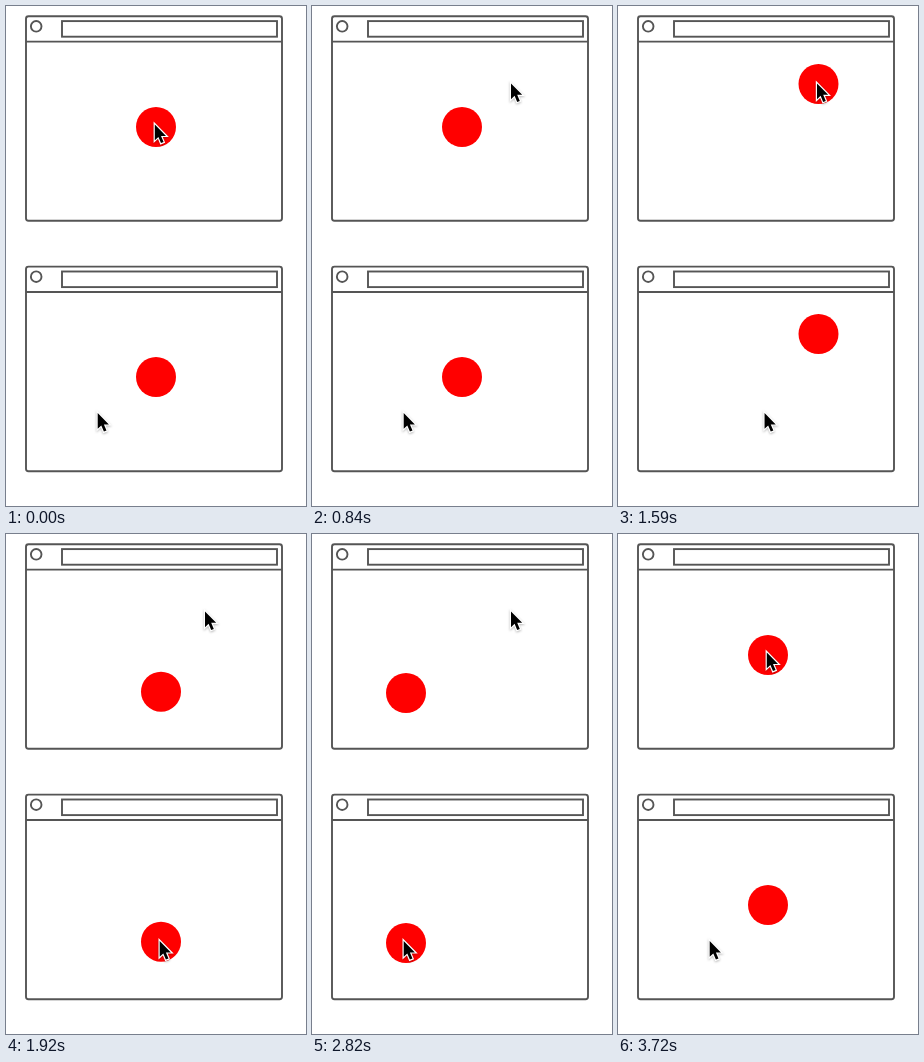
Animation, 300 px wide and 500 px high, one loop 4500 ms. Source, as an HTML page:

```html
<!DOCTYPE html>
<html lang="en">
<head>
<meta charset="utf-8">
<title>Shared drag</title>
<style>
  html, body { margin: 0; width: 100%; height: 100%; overflow: hidden; background: #fff; }
  svg { display: block; width: 100%; height: 100%; }
  .frame { fill: none; stroke: #555; stroke-width: 1.9; }
  .ball { fill: #f00; }
  .cursor { filter: drop-shadow(0 1px 1px rgba(0, 0, 0, .28)); }
  .cursor path { stroke: #fff; stroke-width: 2.4; paint-order: stroke; }
</style>
</head>
<body>
<svg viewBox="0 0 300 500">
  <defs>
    <g id="window" class="frame">
      <rect x="20" y="10.2" width="256" height="204.6" rx="2.5"/>
      <path d="M20 35.6H276"/>
      <circle cx="30.2" cy="20.3" r="5.3"/>
      <rect x="56" y="15.1" width="215" height="15.6"/>
    </g>
    <path id="arrow" d="M0 0V15.8L3.6 12.4L6.2 18.6L8.8 17.5L6.2 11.4H11.2Z"/>
  </defs>
  <use href="#window"/>
  <use href="#window" y="250.4"/>
  <circle class="ball" r="20"/>
  <circle class="ball" r="20"/>
  <g class="cursor"><use href="#arrow" stroke="#fff" stroke-width="2.4"/><use href="#arrow"/></g>
  <g class="cursor"><use href="#arrow" stroke="#fff" stroke-width="2.4"/><use href="#arrow"/></g>
</svg>
<script>
const LOOP = 4500, TICK = 30, MOVE = 750, GAP = 250;

// Each move: start time, cursor index, from, to, time the balls jump, new ball centre
const home = [150, 121];
const moves = [
  { at: 60,   who: 0, from: [148.8, 118.5], to: [199, 77.4],      drop: 870,  ball: [200.5, 78] },
  { at: 1020, who: 1, from: [91.7, 407],    to: [153.7, 407],     drop: 1770, ball: [155, 157.7] },
  { at: 1920, who: 1, from: [153.7, 407],   to: [91.7, 407],      drop: 2670, ball: [94, 159] },
  { at: 2820, who: 0, from: [199, 77.4],    to: [148.8, 118.5],   drop: 3570, ball: home }
];

const balls = document.querySelectorAll('.ball');
const cursors = document.querySelectorAll('.cursor');
const place = (el, x, y) => el.setAttribute('transform', `translate(${x} ${y})`);
const ease = u => u < .5 ? 2 * u * u : 1 - 2 * (1 - u) ** 2;

function draw(time) {
  const t = Math.floor((time % LOOP) / TICK) * TICK;
  const tips = [moves[0].from, moves[1].from];
  let ball = home;
  for (const m of moves) {
    if (t < m.at) break;
    const k = ease(Math.min(1, (t - m.at) / MOVE));
    tips[m.who] = m.from.map((v, i) => v + (m.to[i] - v) * k);
    if (t >= m.drop) ball = m.ball;
  }
  balls.forEach((el, i) => place(el, ball[0], ball[1] + i * GAP));
  cursors.forEach((el, i) => place(el, ...tips[i]));
}

const start = performance.now();
function loop() {
  draw(performance.now() - start);
  requestAnimationFrame(loop);
}
loop();
</script>
</body>
</html>
```
